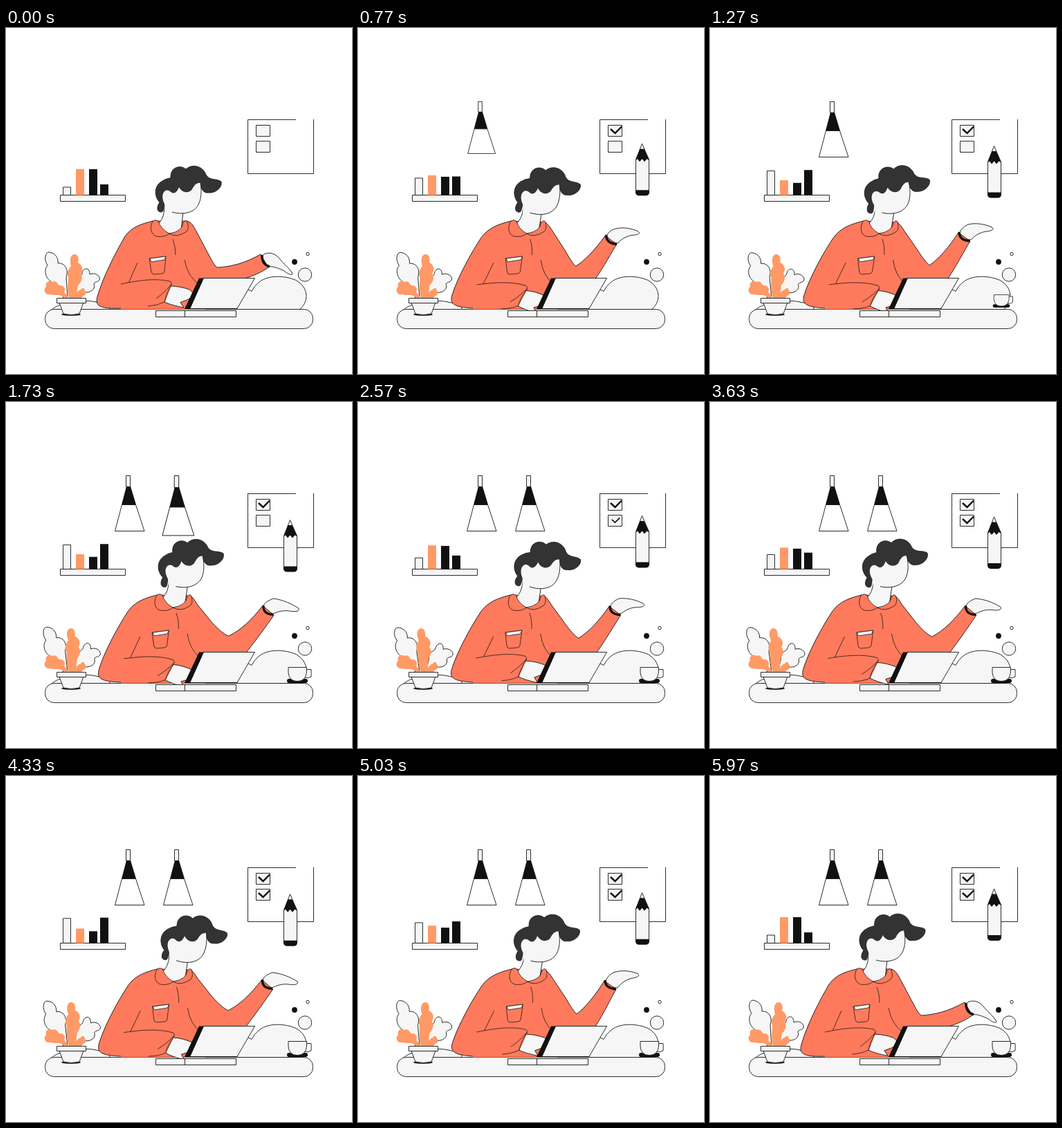
An HTML page that plays this animation: 500 by 500 pixels, repeating every 6 s.

```html
<!DOCTYPE html>
<html lang="en">
<head>
<meta charset="utf-8">
<title>Working at the desk</title>
<style>
  html, body { margin: 0; height: 100%; overflow: hidden; background: #fff; }
  svg { display: block; width: 100%; height: 100%; }
  .line, .pale, .white, .shirt { stroke: #151515; stroke-width: .9; stroke-linejoin: round; }
  .line { fill: none; }
  .pale { fill: #f6f6f6; }
  .white { fill: #fff; }
  .shirt { fill: #ff7a5c; }
  .seam { stroke-width: .75; }
  .black { fill: #111; }
  .hair { fill: #333; stroke: #151515; stroke-width: .8; }
  .orange { fill: #ff9a66; }
  .tick { fill: none; stroke: #111; stroke-width: 2.4; }
</style>
</head>
<body>
<svg viewBox="0 0 500 500">
  <defs>
    <g id="lamp">
      <rect class="pale" x="173.5" y="106.5" width="6" height="16"/>
      <path class="white" d="M167.5 148.500H187.5L200 186.5H157.5Z"/>
      <path class="black" d="M174 122H180L188 148.500H167Z"/>
    </g>
  </defs>

  <!-- wall -->
  <path class="line" d="M419 132.5H349.5V210.5H444.5V132"/>
  <rect class="pale" x="361.5" y="140.5" width="20" height="16"/>
  <rect class="pale" x="361.5" y="163.5" width="20" height="16"/>
  <path id="tick1" class="tick" d="M365 146L371.5 152L381 142.500"/>
  <path id="tick2" class="tick" d="M365 169L371.5 175L381 165.500"/>
  <g id="lamp1"><use href="#lamp"/></g>
  <g id="lamp2"><use href="#lamp" x="70"/></g>
  <g id="pencil">
    <path class="pale" d="M401.500 190L410.5 167L420.500 190V236H401.500Z"/>
    <path class="black" d="M407.500 174.500H413.500L421 191L417.500 189L414 193L410.500 189L407 193L404 189L401 191Z"/>
    <path class="black" d="M401 234H421V238Q420 242 416 242H406Q402 242 401 238Z"/>
  </g>
  <rect class="pale" x="78.5" y="241.5" width="94" height="9"/>
  <rect id="bar0" class="pale" x="82.500" width="11"/>
  <rect id="bar1" class="orange" x="101" width="12"/>
  <rect id="bar2" class="black" x="120" width="12"/>
  <rect id="bar3" class="black" x="136" width="12"/>

  <!-- desk -->
  <path class="pale" d="M64 409C76 396 105 393 125 395L150 400V409Z"/>
  <path class="pale" d="M333 407L345 375L355 380.500Q358 373 366 367C380 356 404 358 419 364.500C438 375 438 396 424 407Z"/>
  <rect class="pale" x="56.500" y="406.500" width="387" height="28" rx="13"/>
  <circle class="pale" cx="432" cy="356.500" r="9.700"/>
  <circle class="black" cx="417" cy="338" r="3.900"/>
  <circle class="white" cx="436" cy="326.500" r="2.200"/>

  <!-- person -->
  <path id="hand" class="pale"/>
  <path id="torso" class="shirt"/>
  <rect x="166" y="402" width="122" height="4.500" fill="#ff7a5c"/>
  <path id="cuff" fill="none" stroke="#111" stroke-width="3.400"/>
  <g id="chest">
    <path class="pale" d="M229 254C229 268 227 276 220 283Q226 298 240 298L253 293L256 266"/>
    <path class="shirt seam" d="M212 279C208 287 208 297 217 301Q229 303 236 297Q224 291 220 279Q216 276 212 279Z"/>
    <path class="shirt seam" d="M236 297Q255 294 256 281Q259 277 262 280Q265 290 261 294Q247 304 236 297Z"/>
    <path class="line seam" d="M241 305Q245 315 245 328M190 339L176 371M258 335Q262 358 278 370"/>
    <path class="line seam" d="M207 333L231 330L229 352Q228 355 225 355L214 356Q211 356 210 352Z"/>
    <path class="pale seam" d="M208 333L231 330L229 335L210 338Z"/>
    <g id="forearm">
      <path class="pale" d="M238 373C247 373 257 375 265 378Q271 382 270 386L264 392L252 396.500L257 404C245 402 236 399 229 396Z"/>
      <path fill="#ff7a5c" d="M150 374L167 370C190 365 215 361 237 366Q240 368 239 371L229 396Q216 402 200 402H165Z"/>
      <path class="line seam" d="M166 370C190 365 215 361 237 366Q240 368 239 371Q231 384 229 396Q219 401 205 402M239 370Q232 380 217 391"/>
    </g>
  </g>
  <g id="head">
    <path class="hair" d="M229 256C227 262 228 266 224 266C217 266 218 257 222 252C213 242 214 226 228 220C232 217 236 218 238 216C237 201 252 197 260 204C270 195 285 200 289 212C294 221 305 217 311 222C313 230 303 239 293 238C286 239 282 234 281 225L270 250H235Z"/>
    <path fill="#f6f6f6" d="M229 254C222 240 230 231 237 236C241 240 246 240 250 230C254 238 264 240 269 233C272 227 276 223 281 224C283 236 282 246 279 253C274 266 260 271 243 266L230 266Z"/>
    <path class="line" d="M281 224C283 236 282 246 279 253C274 266 258 271 240 266"/>
  </g>

  <!-- things on the desk -->
  <path class="pale" d="M285 361.500H359.500L334 405.500H265Z"/>
  <path class="black" d="M279 361.500H286L266 406H258Z"/>
  <path class="pale" d="M216.500 408.500H332.500V417.500H216.500ZM258.500 408.500V417.500"/>
  <g id="cup">
    <rect class="black" x="406" y="400" width="30" height="6" rx="3"/>
    <path class="white" d="M433 386.500H441V397Q437 400 432 398Z"/>
    <path class="pale" d="M408 383.500H434.500V391Q433 403.500 421 403.500Q409 403.500 408 391Z"/>
  </g>
  <path id="leafLeft" class="pale" d="M83 391C80 379 76 371 66 367C57 362 54 350 60 343C54 334 57 324 62 324C71 325 76 332 75 340C85 339 91 349 87 360L89 391Z"/>
  <path id="leafRight" class="pale" d="M98 391C99 380 102 374 101 366C102 359 109 361 110 354C112 346 121 345 121 356C129 352 137 359 135 364C132 368 128 366 127 370C130 377 122 383 114 382C108 383 104 388 103 391Z"/>
  <path id="leafMid" class="orange" d="M91 391C88 376 90 367 90 360C87 352 91 348 94 344C91 334 94 327 99 327C104 327 106 333 104 339C111 343 112 350 108 355C112 362 108 368 104 372L101 391Z"/>
  <path class="orange" d="M85 391C78 383 71 388 65 385C56 387 53 378 58 374C56 367 63 364 67 367C73 364 75 371 77 372C84 371 87 378 84 381L91 391ZM99 391Q101 380 108 378Q112 373 114 379Q118 384 112 387L108 391Z"/>
  <ellipse class="black" cx="94" cy="414" rx="14" ry="1.800"/>
  <path class="pale" d="M77 397H112L106 413Q94 416 83 413Z"/>
  <rect class="pale" x="73.500" y="390.500" width="42" height="7"/>
</svg>
<script>
const LOOP = 6000;
const $ = id => document.getElementById(id);
const lerp = (a, b, k) => a + (b - a) * k;
const ease = k => (1 - Math.cos(Math.PI * Math.min(1, Math.max(0, k)))) / 2;
const wave = (t, period) => (1 - Math.cos(2 * Math.PI * t / period)) / 2;
const place = (id, transform) => $(id).setAttribute('transform', transform);

// Blend two paths that share the same commands.
function blend(a, b, k) {
  const ends = b.match(/[\d.]+/g);
  let i = 0;
  return a.replace(/[\d.]+/g, n => lerp(+n, +ends[i++], k).toFixed(2));
}

const rest = {
  lean: 0,
  torso: 'M166 405C136 406 128 402 132 388C140 360 158 325 172 301C182 287 196 283 212 279L262 279C268 281 270 285 273 290L290 322C296 333 300 342 305 346C325 345 345 340 368 327L379 346C368 354 357 358 345 362L288 405Z',
  cuff: 'M370 328Q369 341 381 345',
  hand: 'M370 329C376 323 388 324 395 333C400 340 410 347 414 355C414 358 408 356 402 351C394 347 385 344 381 345C375 343 371 336 370 329Z'
};
const raised = {
  lean: 1,
  torso: 'M166 405C138 403 132 398 137 384C145 360 164 325 179 303C190 288 206 283 222 279L271 281C276 284 278 287 281 292L301 322C307 333 312 340 316 344C328 335 342 318 356 296L373 308C366 320 356 342 343 362L288 405Z',
  cuff: 'M357 295Q357 307 373 308',
  hand: 'M358 296C360 290 364 287 369 284C380 280 392 281 403 285C409 288 404 291 396 292C388 294 380 299 375 306C367 306 360 302 358 296Z'
};
const reaching = {
  lean: .5,
  torso: 'M166 405C137 404 130 400 134 386C142 360 161 325 176 302C186 288 201 283 217 279L266 280C270 283 272 287 275 292L297 318C307 328 316 335 323 337C342 328 357 315 374 294L390 308C378 325 362 345 348 362L288 405Z',
  cuff: 'M375 294Q374 307 389 307',
  hand: 'M375 294C377 289 384 286 390 284C404 287 418 294 427 301C428 306 420 306 412 304C402 302 395 304 388 306C381 306 376 301 375 294Z'
};
const poses = [rest, raised, reaching, raised, reaching, raised, rest];

const bars = [[230, 205], [204, 221], [204, 225], [226, 204]];

// Each item grows past full size, then settles: [id, start, centre x, centre y].
const pops = [
  ['tick1', 100, 371.5, 149], ['pencil', 100, 411, 205], ['lamp1', 466, 177, 106],
  ['cup', 1000, 421, 395], ['lamp2', 1330, 247, 106], ['tick2', 2330, 371.5, 172]
];
const popSize = age => age < 400 ? 1.08 * ease(age / 400) : lerp(1.08, 1, ease((age - 400) / 250));

function drawPerson(t) {
  const step = Math.floor(t / 1000);
  const k = ease(t / 1000 - step);
  const from = poses[step], to = poses[step + 1];
  for (const part of ['torso', 'cuff', 'hand']) {
    $(part).setAttribute('d', blend(from[part], to[part], k));
  }
  const lean = lerp(from.lean, to.lean, k);
  const nod = 4 * Math.sin(2 * Math.PI * t / 2000);
  place('chest', `matrix(1 0 ${-.055 * lean} 1 ${25.5 * lean} 0)`);
  place('head', `translate(${9.5 * lean} ${lean}) rotate(${nod} 240 268)`);
  place('forearm', `rotate(${4.5 * wave(t, 500)} 155 388)`);
}

function draw(t) {
  drawPerson(t);

  const bob = wave(t, 3000);
  bars.forEach(([low, high], i) => {
    const top = lerp(low, high, bob);
    $('bar' + i).setAttribute('y', top);
    $('bar' + i).setAttribute('height', 241.5 - top);
  });

  for (const [id, start, x, y] of pops) {
    const size = popSize(t - start);
    const drift = id === 'pencil' ? 8 * bob - 4 : 0;
    $(id).style.display = size > 0 ? '' : 'none';
    place(id, `translate(${x} ${y + drift}) scale(${size}) translate(${-x} ${-y})`);
  }

  const sway = wave(t, LOOP);
  place('leafLeft', `rotate(${-4.4 * sway} 86 390)`);
  place('leafMid', `rotate(${-8.2 * sway} 96 390)`);
  place('leafRight', `rotate(${4 * sway} 100 390)`);
}

const begin = performance.now();
function tick() {
  draw((performance.now() - begin) % LOOP);
  requestAnimationFrame(tick);
}
tick();
</script>
</body>
</html>
```
